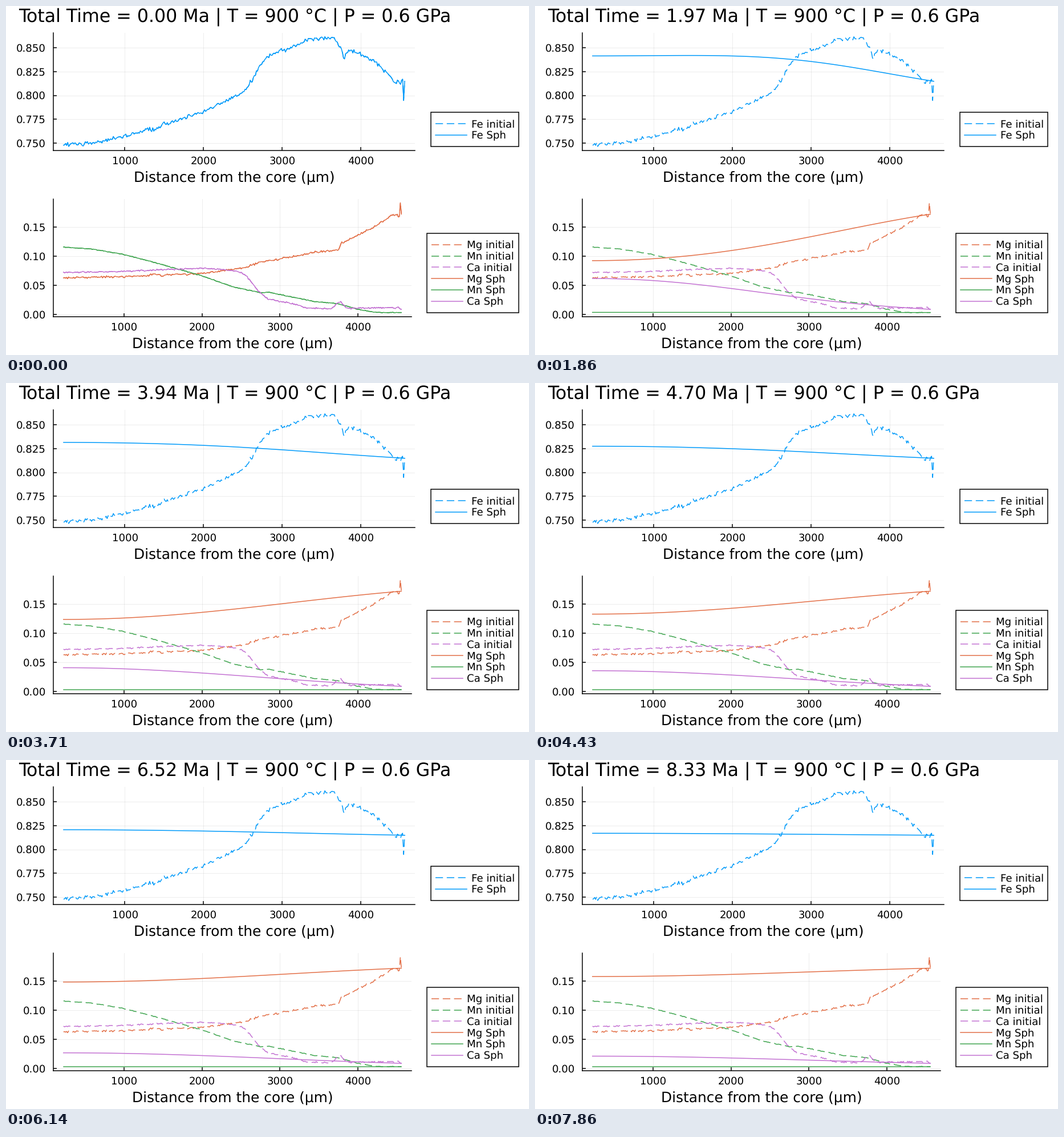
Write a matplotlib script that moves like this. It is 917 px wide and 611 px high and loops after 8000 ms.

```python
import numpy as np
import matplotlib.pyplot as plt
from matplotlib.animation import FuncAnimation
from matplotlib.patches import Rectangle

W, H, DPI = 917, 611, 64
PX = 72 / DPI                      # points per pixel
TICK_MS, TICKS, STEPS = 40, 200, 56
STEPS_PER_MS = 7 / 1000
MA_PER_STEP = 5 / 33
X_CORE, X_RIM = 222.4, 4558.7      # ends of the transect, in µm

BLUE, ORANGE, GREEN, PURPLE = "#009afa", "#e36f47", "#3ea44e", "#c371d2"
TRIO = [("Mg", ORANGE), ("Mn", GREEN), ("Ca", PURPLE)]
TITLE, LABEL, SMALL = (pt * 2.2589 for pt in (14, 11, 8))   # in pixels
LINE = 1.5

plt.rcParams.update({
    "font.family": "DejaVu Sans",
    "text.hinting": "none",
    "path.simplify": False,
})


def trend(x, *knots):
    kx, ky = np.array(knots).T
    return np.interp(x, kx, ky)


def bump(x, height, centre, width):
    return height * np.exp(-((x - centre) / width) ** 2 / 2)


def profiles(x):
    """Zoning of Mg, Mn and Ca along the garnet, as mole fractions."""
    mg = trend(x, (222, 63), (1000, 65.3), (2000, 70.8), (2400, 77.5),
               (2600, 82.5), (2750, 91), (3000, 95.5), (3450, 107),
               (3750, 111), (3830, 125.5), (4020, 137.5), (4240, 153),
               (4430, 170.5), (4559, 172.5))
    mg += bump(x, 2, 1400, 50) - bump(x, 2.5, 1490, 20) + bump(x, 7, 3790, 9)
    mg += bump(x, 20.5, 4546, 4) - bump(x, 5, 4525, 9)
    mn = trend(x, (222, 116), (600, 112.5), (1000, 103.3), (1461, 87),
               (2000, 66.5), (2413, 47), (2757, 37.5), (2850, 38.5),
               (3440, 22.5), (3732, 19), (4050, 7.5), (4250, 3.5), (4559, 3.5))
    ca = trend(x, (222, 72.5), (1000, 74.2), (2000, 79.8), (2200, 78.5),
               (2450, 74.5), (2560, 68), (2730, 39.5), (2850, 26.5),
               (3200, 18), (3320, 11.5), (3650, 10.3), (4450, 12), (4559, 9))
    ca += bump(x, 11.5, 3765, 45) + bump(x, 3, 4515, 13)
    return np.stack([mg, mn, ca], axis=1) / 1000


def tracer(d0, q, dv, temp=1173.15, pressure=0.6e9):
    """Arrhenius tracer diffusivity: d0 in cm²/s, result in µm²/Ma."""
    d = d0 * np.exp(-(q + pressure * dv * 1e-6) / (8.314 * temp))
    return d * 1e8 * 3.156e13


D_FE = tracer(6.4e-4, 275430, 5.6)
D = np.array([tracer(1.1e-3, 284516, 5.3),
              tracer(5.1e-4, 253440, 6.0),
              0.5 * D_FE])         # Mg, Mn, Ca


def coupled(c):
    """Multicomponent diffusion matrices, with Fe as the dependent one."""
    total = c @ D + (1 - c.sum(1)) * D_FE
    return np.diag(D) - (c * D / total[:, None])[:, :, None] * (D - D_FE)


def diffuse(n=90, substeps=8):
    """Implicit diffusion in a sphere whose rim composition is fixed."""
    r = np.linspace(0, X_RIM - X_CORE, n + 1)
    face = (r[1:] + r[:-1]) / 2
    vol = np.diff(np.r_[0, face, r[-1]] ** 3) / 3
    dt = MA_PER_STEP / substeps
    g = (dt * face ** 2 / r[1])[:, None, None]
    v = vol[:, None, None]
    i = np.arange(n)
    size = 3 * (n + 1)
    c = profiles(r + X_CORE)
    states = [c]
    for _ in range(STEPS - 1):
        for _ in range(substeps):
            k = g * coupled((c[1:] + c[:-1]) / 2)
            a = np.zeros((n + 1, 3, n + 1, 3))
            a[i, :, i, :] += k / v[:-1]
            a[i, :, i + 1, :] -= k / v[:-1]
            a[i + 1, :, i + 1, :] += k / v[1:]
            a[i + 1, :, i, :] -= k / v[1:]
            a[n] = 0
            a = a.reshape(size, size) + np.eye(size)
            c = np.linalg.solve(a, c.ravel()).reshape(n + 1, 3)
        states.append(c)
    return r + X_CORE, states


def with_fe(c):
    return [1 - c.sum(1), *c.T]


rng = np.random.default_rng(12)
x_meas = np.linspace(X_CORE, X_RIM, 330)
noise = rng.normal(0, [0.0008, 0.0003, 0.0006], (x_meas.size, 3))
noise[-4:] = 0
measured = with_fe(profiles(x_meas) + noise)
x_sim, states = diffuse()

fig = plt.figure(figsize=(W / DPI, H / DPI), dpi=DPI, facecolor="white")
page = fig.add_axes([0, 0, 1, 1], zorder=-1)
page.set(xlim=(0, W), ylim=(H, 0))
page.axis("off")

SOLID = dict(lw=LINE * PX, solid_joinstyle="round")
DASHED = dict(lw=LINE * PX, ls=(0, (8.8, 4.4)), dash_joinstyle="round")


def write(x, y, s, size, ha="center"):
    return page.text(x, y, s, fontsize=size * PX, ha=ha, va="baseline")


def chart(left, top, right, bottom, ylim, yticks, fmt):
    ax = fig.add_axes([left / W, 1 - bottom / H,
                       (right - left) / W, (bottom - top) / H])
    xlim = (92.3, 4688.8)
    xticks = range(1000, 5000, 1000)
    ax.set(xlim=xlim, ylim=ylim, xticks=xticks, yticks=yticks)
    ax.patch.set_visible(False)
    ax.set_axisbelow(True)
    ax.grid(color="black", alpha=0.09, lw=0.8 * PX)
    ax.tick_params(direction="in", length=6 * PX, width=LINE * PX,
                   labelbottom=False, labelleft=False)
    ax.spines[["top", "right"]].set_visible(False)
    ax.spines[["left", "bottom"]].set_linewidth(LINE * PX)
    for t in xticks:
        px = left + (t - xlim[0]) / (xlim[1] - xlim[0]) * (right - left)
        write(px + 0.5, bottom + 24.2, str(t), SMALL)
    for t in yticks:
        py = bottom - (t - ylim[0]) / (ylim[1] - ylim[0]) * (bottom - top)
        write(70, py + 6.6, format(t, fmt), SMALL, "right")
    write((left + right) / 2 + 0.7, bottom + 55,
          "Distance from the core (µm)", LABEL)
    return ax


def legend(left, top, bottom, entries, right=899, row=19.8):
    page.add_patch(Rectangle((left, top), right - left, bottom - top,
                             fc="white", ec="black", lw=LINE * PX))
    first = (top + bottom - row * (len(entries) - 1)) / 2
    for k, (name, color, style) in enumerate(entries):
        y = first + row * k
        page.plot([left + 8, left + 62.5], [y, y], color=color, **style)
        write(left + 70.5, y + 6.6, name, SMALL, "left")


upper = chart(83, 47, 717, 252.5, (0.7425, 0.8656),
              np.arange(0.75, 0.86, 0.025), ".3f")
lower = chart(83, 338, 711, 543.5, (-0.0032, 0.1986),
              np.arange(0, 0.16, 0.05), ".2f")
title = write(401.2, 28, "", TITLE)

legend(745, 186, 245.5,
       [("Fe initial", BLUE, DASHED), ("Fe Sph", BLUE, SOLID)])
legend(738, 398, 536.5,
       [(f"{el} initial", col, DASHED) for el, col in TRIO]
       + [(f"{el} Sph", col, SOLID) for el, col in TRIO])

panels = [(upper, BLUE)] + [(lower, col) for _, col in TRIO]
for (ax, col), y in zip(panels, measured):
    ax.plot(x_meas, y, color=col, **DASHED)
curves = [ax.plot([], [], color=col, **SOLID)[0] for ax, col in panels]


def update(tick):
    # the small lead lets each step fall on the nearest tick or just before
    step = int((tick * TICK_MS + 35) * STEPS_PER_MS)
    title.set_text(f"Total Time = {step * MA_PER_STEP:.2f} Ma"
                   " | T = 900 °C | P = 0.6 GPa")
    if step == 0:
        x, values = x_meas, measured
    else:
        x, values = x_sim, with_fe(states[step])
    for curve, y in zip(curves, values):
        curve.set_data(x, y)
    return [title, *curves]


anim = FuncAnimation(fig, update, frames=TICKS, init_func=lambda: update(0),
                     interval=TICK_MS, repeat=True, repeat_delay=0)
plt.show()
```
